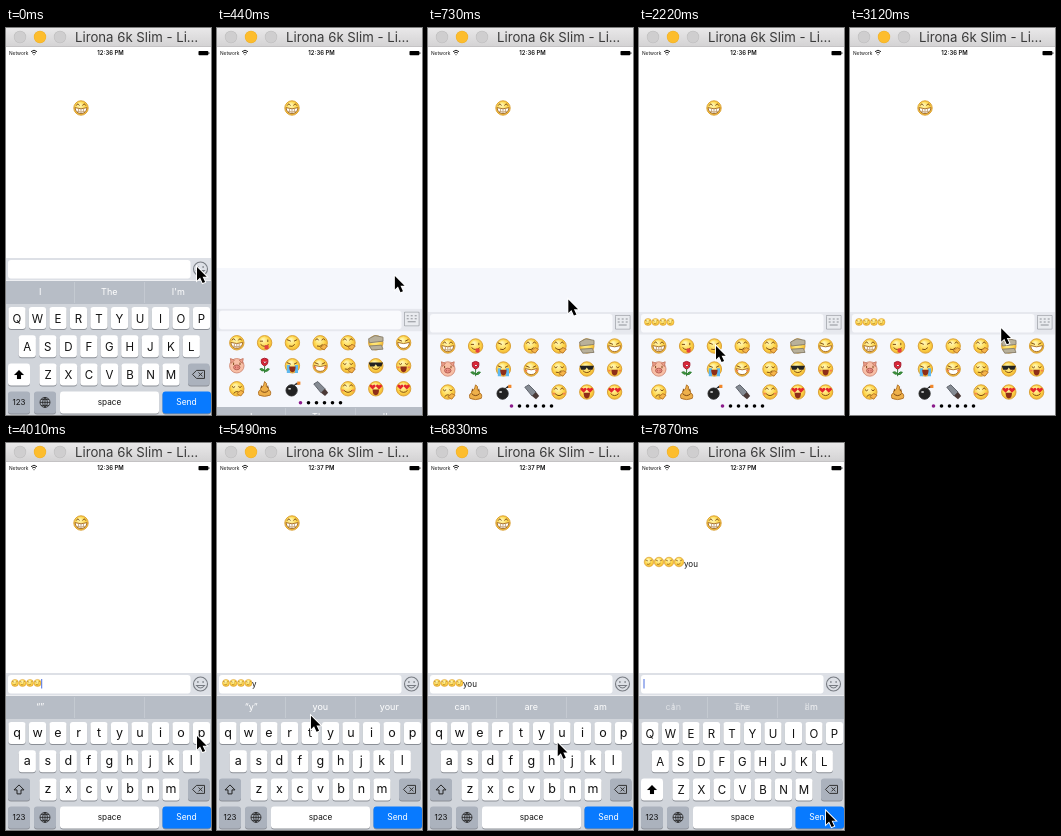
Recreate the animation shown at these times as an HTML page with a canvas. Size 205 px wide and 387 px high, loop 8000 ms.

```html
<!DOCTYPE html>
<html lang="en">
<head>
<meta charset="utf-8">
<title>Emoji keyboard</title>
<style>
html, body { margin: 0; width: 205px; height: 387px; overflow: hidden; background: #fff; }
canvas { display: block; width: 205px; height: 387px; }
</style>
</head>
<body>
<canvas id="stage"></canvas>
<script>
const W = 205, H = 387, LOOP = 8000;
const FONT = 'Inter, "Liberation Sans", sans-serif';
const canvas = document.getElementById('stage');
const dpr = window.devicePixelRatio || 1;
canvas.width = W * dpr;
canvas.height = H * dpr;
const ctx = canvas.getContext('2d');

const TICKS = [
  [150, 1170, 8], [1320, 1320, 1], [1620, 1770, 2], [2070, 2220, 2], [2520, 3560, 8],
  [3710, 4750, 8], [4900, 5050, 2], [5350, 6390, 8], [6530, 7570, 8], [7720, 7870, 2]
];
const CURSOR = [
  [0, 191, 239], [300, 191, 239], [580, 165, 257], [730, 141, 271],
  [880, 106, 294], [1020, 83, 312], [1170, 75, 318], [1320, 77, 318], [2370, 77, 318],
  [2960, 132, 305], [3410, 188, 291], [3560, 192, 293], [4010, 191, 293], [4160, 182, 291],
  [4600, 118, 290], [4750, 112, 290], [5350, 109, 287], [5495, 94, 273], [5650, 92, 263],
  [6390, 99, 263], [6530, 103, 268], [7130, 157, 332], [7570, 187, 368]
];
const HIDDEN = [[0, 0], [150, 0], [296, .5], [441, .94], [587, 1], [3560, 1], [3710, .5], [3859, .06], [4007, 0]];
const HINTS = [
  [-999, ['I', 'The', "I'm"]], [3710, ['“”', '', '']], [4900, ['“y”', 'you', 'your']],
  [5940, ['can', 'are', 'am']], [7870, ['I', 'The', "I'm"]]
];

const gold = ctx.createRadialGradient(-2, -4, 1, 0, 0, 10);
gold.addColorStop(0, '#fff6b0');
gold.addColorStop(.6, '#fed74c');
gold.addColorStop(1, '#eeab2a');

const BROWN = '#7a4512', DISC = 'M-9 0a9 9 0 1 0 18 0a9 9 0 1 0-18 0z';
// Emoji parts on a 20-unit grid: path, fill, stroke.
const PARTS = {
  ball: [DISC, gold, '#dba238'],
  arc: ['M-6-3q2-4 4 0M2-3q2-4 4 0', 0, BROWN],
  down: ['M-6-3q2 3 4 0M2-3q2 3 4 0', 0, BROWN],
  slant: ['M-7-4l5 2M6-4l-4 2', 0, BROWN],
  wink: ['M-6-2h4M4-4v3', 0, BROWN],
  dots: ['M-4-4v3M4-4v3', 0, BROWN],
  hearts: ['M-4 1l-4-4q1-4 4-1q3-3 4 1zM4 1l-4-4q1-4 4-1q3-3 4 1z', '#e3262b'],
  shades: ['M-9-4h18l-2 5h-5l-2-3l-2 3h-5z', '#222'],
  grin: ['M-7.5-.5q7.5 3 15 0q-1 7.5-7.5 7.5q-6.5 0-7.5-7.5z', '#fff', '#a8702a'],
  teeth: ['M-6 4q6 2 12 0M-3 1v5M0 1v5.5M3 1v5', 0, '#c5a57a'],
  smile: ['M-5 2q5 5 10 0', 0, BROWN],
  smirk: ['M-4 4q4 2 7-2', 0, BROWN],
  frown: ['M-4 6q4-5 8 0', 0, BROWN],
  open: ['M-4 1h8q0 7-4 7q-4 0-4-7z', '#8e2d18'],
  tongue: ['M0 3h5v4q-2.5 3-5 0z', '#e5413f'],
  cheeks: ['M-8 1h3v2h-3zM5 1h3v2h-3z', '#f5834a'],
  tears: ['M-7-1h4v10h-4zM3-1h4v10h-4z', '#5fb8ee'],
  hand: ['M0 6l5-4l4 2l-4 5z', '#f6b64a', '#b9792a'],
  hood: ['M-9-5l8-4l10 2v5l-17 2zM-8 4l15-1l2 5l-14 1z', '#b9b19b', '#8a816e'],
  hog: [DISC, '#f8bfa6', '#d48f7a'],
  ears: ['M-8-9l5 2l-4 4zM8-9l-5 2l4 4z', '#ee9f8a', '#c77b66'],
  snout: ['M-4 2a4 3 0 1 0 8 0a4 3 0 1 0-8 0M-1.5 1v2M1.5 1v2', '#ef9183', '#b25f52'],
  stem: ['M0 0v9M0 7q3-5 6-3q-2 4-6 3M0 6q-3-4-6-2q2 4 6 2', '#3f9a3c', '#2f7d33'],
  bloom: ['M-4-8q4-3 8 0q1 7-4 8q-5-1-4-8zM-2-5q2 4 5 0', '#dc2637', '#a41a2c'],
  pile: ['M0-9q4 2 2 6q4 1 3 4q4 2 2 7q-7 3-14 0q-2-5 2-7q-1-3 3-4q1-2 2-6z', '#eeb04a', '#b3752a'],
  bomb: ['M-8 2a7 7 0 1 0 14 0a7 7 0 1 0-14 0zM2-4l3-3l3 1', '#222', '#222'],
  spark: ['M6-9h4v4h-4z', '#f0872b'],
  shine: ['M-5-1h3v2h-3z', '#ddd'],
  blade: ['M-8-6l5-3l9 9l-5 5z', '#858b93', '#5d626a'],
  grip: ['M1 5l5-5l4 5l-4 4z', '#4b3a37']
};
for (const part of Object.values(PARTS)) part[0] = new Path2D(part[0]);

const GRID = [
  'ball arc grin teeth', 'ball wink smile tongue', 'ball slant smirk', 'ball arc smirk hand', 'ball arc smile hand', 'ball dots hood', 'ball slant grin',
  'hog ears dots snout', 'stem bloom', 'ball slant tears open', 'ball slant grin cheeks', 'ball down smirk hand', 'ball shades smile', 'ball down cheeks open',
  'ball down frown hand', 'pile dots smile', 'bomb spark shine', 'blade grip', 'ball arc smile cheeks', 'ball hearts open', 'ball hearts smile'
];

// Path shapes drawn as icons.
const ARROW = 'M0-5l5 5h-3v4h-4v-4h-3z';
const POINTER = 'M0 0v13.5l3.1-3l2.5 5.6l2.5-1l-2.5-5.4h4.1z';
const ERASE = 'M-6 0l4-4h8v8h-8zM0-2l4 4m0-4l-4 4';
const GLOBE = 'M-5 0a5 5 0 1 0 10 0a5 5 0 1 0-10 0h10M0-5v10M0-5q-5 5 0 10q5-5 0-10M-4-3h8M-4 3h8';
const SMILEY = 'M-7 0a7 7 0 1 0 14 0a7 7 0 1 0-14 0M-2.6-3v2M2.6-3v2M-4 1.5q4 5 8 0z';
const KEYPAD = 'M-5-3h2m2 0h2m2 0h2M-5 0h2m2 0h2m2 0h2M-4 3h8';
const WIFI = 'M-3-3q3-3 6 0M-2-1.5q2-2 4 0M-.5 0h1';

function stepTime(t) {
  let last = 0;
  for (const [from, to, n] of TICKS) {
    if (t + 9 < from) break;
    const gap = n > 1 ? (to - from) / (n - 1) : 1;
    last = from + gap * Math.min(n - 1, Math.floor((t + 9 - from) / gap));
  }
  return last;
}

function track(keys, t) {
  const i = keys.findIndex(k => k[0] > t);
  if (i < 0) return keys[keys.length - 1].slice(1);
  const a = keys[i - 1], b = keys[i], f = (t - a[0]) / (b[0] - a[0]);
  return a.slice(1).map((v, j) => v + (b[j + 1] - v) * f);
}

function rect(x, y, w, h, fill, r = 0) {
  ctx.fillStyle = fill;
  ctx.beginPath();
  ctx.roundRect(x, y, w, h, r);
  ctx.fill();
}

function dot(x, y, r, fill) {
  rect(x - r, y - r, 2 * r, 2 * r, fill, r);
}

function text(s, x, y, size, fill = '#111', align = 'center', weight = 400) {
  ctx.font = `${weight} ${size}px ${FONT}`;
  ctx.textAlign = align;
  ctx.fillStyle = fill;
  ctx.fillText(s, x, y);
}

function icon(path, x, y, fill, stroke, width = 1) {
  ctx.save();
  ctx.translate(x, y);
  const p = new Path2D(path);
  ctx.lineWidth = width;
  if (stroke) { ctx.strokeStyle = stroke; ctx.stroke(p); }
  if (fill) { ctx.fillStyle = fill; ctx.fill(p); }
  ctx.restore();
}

function emoji(kind, x, y, size) {
  ctx.save();
  ctx.translate(x, y);
  ctx.scale(size / 20, size / 20);
  ctx.lineWidth = 1.2;
  for (const name of GRID[kind].split(' ')) {
    const [path, fill, stroke] = PARTS[name];
    if (fill) { ctx.fillStyle = fill; ctx.fill(path); }
    if (stroke) { ctx.strokeStyle = stroke; ctx.stroke(path); }
  }
  ctx.restore();
}

function drawChrome(t) {
  const bar = ctx.createLinearGradient(0, 0, 0, 19);
  bar.addColorStop(0, '#e9e8e9');
  bar.addColorStop(1, '#d3d2d3');
  rect(0, 0, W, 19, bar);
  rect(0, 18.5, W, .6, '#b5b4b5');
  ['#cfcecf', '#fdbd2d', '#cfcecf'].forEach((c, i) => {
    dot(14 + 20 * i, 9, 6.2, i === 1 ? '#efb02a' : '#bdbcbd');
    dot(14 + 20 * i, 9, 5.7, c);
  });
  text('Lirona 6k Slim - Li…', 69, 14, 13.2, '#3a3a3a', 'left');
  text('Network', 3, 27.2, 4.8, '#111', 'left');
  icon(WIFI, 28, 26.7, 0, '#111', .9);
  text(t < 4900 ? '12:36 PM' : '12:37 PM', 104.5, 27.4, 5.9, '#111', 'center', 600);
  rect(192.5, 23, 9.8, 4.2, '#000', .8);
  rect(202.5, 24.2, .8, 1.8, '#000');
}

function drawMessages(t) {
  emoji(0, 75, 80, 16);
  if (t < 7870) return;
  for (let i = 0; i < 4; i++) emoji(2, 10 + 10 * i, 119, 10.6);
  text('you', 45, 124, 8, '#111', 'left');
}

function drawInput(t, y, panel) {
  rect(0, y, W, 22.5, panel ? '#e6e8ee' : '#dde0e6');
  rect(2, y + 2, 182.5, 18.5, panel ? '#f9fafd' : '#fff', 3);
  if (panel) {
    rect(187, y + 3, 15.5, 14.5, '#a3a6ac', 1);
    rect(187.8, y + 3.8, 13.9, 12.9, '#e9ebef', .5);
    icon(KEYPAD, 194.7, y + 10, 0, '#85888e', .9);
  } else {
    icon(SMILEY, 194.5, y + 11, 0, '#777b82', 1.1);
  }
  const sent = t >= 7870;
  const count = sent ? 0 : [1620, 1770, 2070, 2220].filter(s => t >= s).length;
  for (let i = 0; i < count; i++) emoji(2, 9 + 7.5 * i, y + 10, 7.9);
  const word = sent || t < 4900 ? '' : t < 5940 ? 'y' : 'you';
  text(word, 35, y + 13.5, 8, '#111', 'left');
  const blink = t >= 5940 && Math.floor(t / 500) % 2 === 0;
  if (sent || (t >= 3710 && t < 4900) || blink) {
    rect(sent ? 4.5 : word ? 49.5 : 35.2, y + 6, 1, 9.5, '#4b6fe0');
  }
}

function drawPanel(y) {
  rect(0, y, W, H, '#f5f7fc');
  GRID.forEach((_, i) => emoji(i, 19.8 + 27.8 * (i % 7), y + 12 + 23 * Math.floor(i / 7), 16));
  for (let i = 0; i < 6; i++) dot(83.5 + 8 * i, y + 72, 1.8, i ? '#000' : '#8b1a8b');
}

function drawHints(t, y) {
  rect(0, y, W, 23, '#b7bdc6');
  rect(68.3, y + 1, .6, 21, '#cdd2d9');
  rect(138, y + 1, .6, 21, '#cdd2d9');
  let i = HINTS.length - 1;
  while (HINTS[i][0] > t + 5) i--;
  const fresh = t - HINTS[i][0] < 100 ? .5 : 1;
  const show = (words, alpha) => {
    ctx.globalAlpha = alpha;
    words.forEach((w, k) => text(w, 34.3 + 69 * k, y + 13.5, 9, '#fff'));
    ctx.globalAlpha = 1;
  };
  if (fresh < 1) show(HINTS[i - 1][1], 1 - fresh);
  show(HINTS[i][1], fresh);
}

function key(x, y, w, fill = '#fff') {
  rect(x, y + 1, w, 22, '#8b8f96', 3);
  rect(x, y, w, 22, fill, 3);
}

function drawKeyboard(t, y) {
  const caps = t < 3710 || t >= 7870, grey = '#abb2bd';
  rect(0, y, W, H, '#d1d5db');
  drawHints(t, y);
  ['QWERTYUIOP', 'ASDFGHJKL', 'ZXCVBNM'].forEach((row, r) => {
    [...row].forEach((c, i) => {
      const x = [11, 21.3, 42][r] + 20.5 * i, top = y + 26 + 28.2 * r;
      key(x - 8.6, top, 17.2);
      text(caps ? c : c.toLowerCase(), x, top + (caps ? 15.5 : 14.8), caps ? 11.5 : 12.5);
    });
  });
  const low = y + 82.4, base = y + 110.4;
  key(2, low, 22, caps ? '#fff' : grey);
  icon(ARROW, 13, low + 11.5, caps ? '#000' : 0, '#222', caps ? .1 : 1);
  key(182, low, 21.5, grey);
  icon(ERASE, 192.5, low + 11, 0, '#333');
  key(2, base, 22, grey);
  text('123', 13, base + 14, 8);
  key(28, base, 22, grey);
  icon(GLOBE, 39, base + 11, 0, '#222', .8);
  key(54, base, 99);
  text('space', 103.5, base + 13.7, 8.2);
  const pressed = t >= 7720 && t < 7870;
  key(156.5, base, 48.5, pressed ? '#fff' : '#087aff');
  text('Send', 180.5, base + 13.8, 8.5, pressed ? '#111' : '#fff');
}

function draw(now) {
  const t = stepTime(now % LOOP);
  const [hidden] = track(HIDDEN, t);
  const panel = t >= 290 && t < 3700;
  const bar = 230 + 54 * hidden;
  ctx.setTransform(dpr, 0, 0, dpr, 0, 0);
  rect(0, 0, W, H, '#fff');
  rect(0, 240, W, bar - 240, '#f5f7fc');
  drawChrome(t);
  drawMessages(t);
  if (panel) drawPanel(bar + 22);
  if (hidden < 1) drawKeyboard(t, 253 + 134 * hidden);
  drawInput(t, bar, panel);
  const [x, y] = track(CURSOR, t);
  icon(POINTER, x, y, '#000', '#fff', 1.8);
  requestAnimationFrame(draw);
}
requestAnimationFrame(draw);
</script>
</body>
</html>
```
